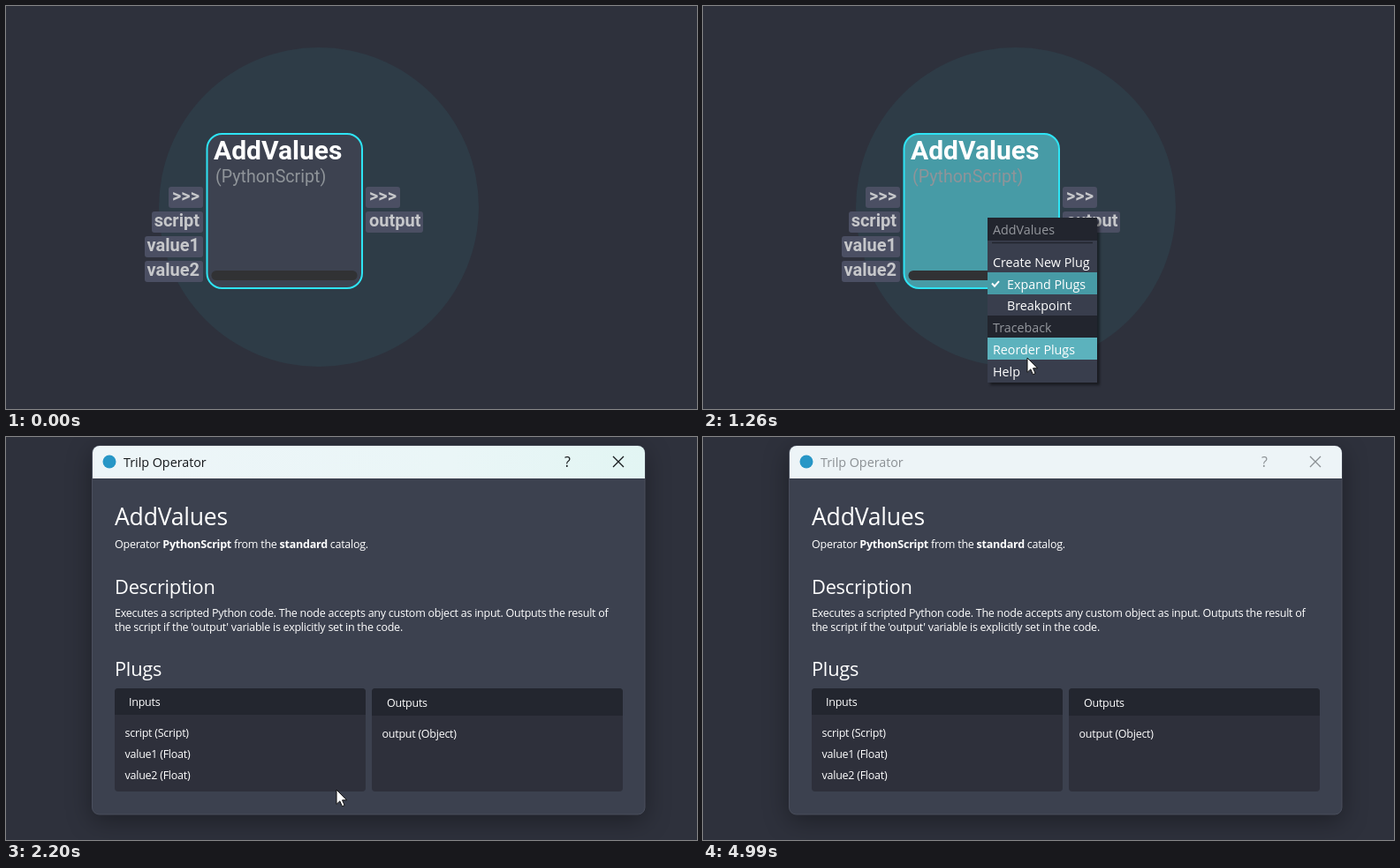
Write an HTML page that moves like this. It is 782 px wide and 457 px high and loops after 5.06 s.

```html
<!DOCTYPE html>
<html lang="en">
<head>
<meta charset="utf-8">
<title>Node help</title>
<style>
  html, body { margin: 0; width: 100%; height: 100%; overflow: hidden; background: #2e313c; }
  svg { display: block; width: 782px; height: 457px; }
  text { white-space: pre; }
  .node { font-family: Roboto, sans-serif; }
  .port { font-size: 20px; font-weight: 700; fill: #c6c7ca; }
  .ui { font: 14.3px "Open Sans", "Noto Sans", sans-serif; }
  .doc { font: 12.5px "Open Sans", "Noto Sans", sans-serif; letter-spacing: -.02em; fill: #fff; }
  .doc .h1 { font-size: 26.6px; }
  .doc .h2 { font-size: 21.8px; }
  .doc .b { font-weight: 700; }
  #window { filter: drop-shadow(0 7px 14px rgba(0, 0, 0, .35)); }
  #menuBox { filter: drop-shadow(3px 3px 1.5px rgba(0, 0, 0, .45)); }
</style>
</head>
<body>
<svg viewBox="0 0 782 457">
  <defs>
    <linearGradient id="bar">
      <stop offset="0" stop-color="#edf5f8"/>
      <stop offset=".65" stop-color="#eaf6f7"/>
      <stop offset="1" stop-color="#e2f5f3"/>
    </linearGradient>
  </defs>
  <rect width="782" height="457" fill="#2e313c"/>
  <circle cx="354" cy="228" r="181" fill="#2e3c47"/>

  <g class="node">
    <rect id="body" x="227.5" y="145" width="175.5" height="175" rx="17" stroke="#2ee4f4" stroke-width="2"/>
    <text x="235" y="174" font-size="30" font-weight="700" fill="#fff">AddValues</text>
    <text x="237" y="200" font-size="19.6" fill="#8f9499">(PythonScript)</text>
    <rect x="232.5" y="300" width="165" height="11" rx="5.5" fill="#313234"/>
    <g id="ports"></g>
  </g>

  <g id="menu" class="ui">
    <rect id="menuBox" x="322" y="240" width="124" height="187" fill="#393e4d"/>
    <g id="rows"></g>
    <path d="M322 265.5H446" stroke="#23262f"/>
    <path d="M327 268.5H441" stroke="#22252e" stroke-width="1.5"/>
    <path d="M327 314.5l3 3.2 5-5.5" fill="none" stroke="#fff" stroke-width="2"/>
  </g>

  <g id="dialog">
    <rect id="window" x="97.5" y="10" width="625.5" height="418" rx="8" fill="#3c414f" stroke="#4a4f5d"/>
    <path id="titleBar" d="M98 47V18a8 8 0 0 1 8-8H715a8 8 0 0 1 8 8V47Z"/>
    <circle cx="117" cy="28" r="7.5" fill="#2796c6"/>
    <g id="titleText" class="ui">
      <text x="133" y="34">Trilp Operator</text>
      <text x="632" y="34" font-size="16">?</text>
      <path d="M687 22l12 12M699 22l-12 12" stroke="currentColor" stroke-width="1.3"/>
    </g>
    <g id="doc" class="doc">
      <text class="h1" x="123" y="100">AddValues</text>
      <text x="123" y="126">Operator <tspan class="b">PythonScript</tspan> from the <tspan class="b">standard</tspan> catalog.</text>
      <text class="h2" x="123" y="178">Description</text>
      <text x="123" y="204">Executes a scripted Python code. The node accepts any custom object as input. Outputs the result of</text>
      <text x="123" y="220">the script if the 'output' variable is explicitly set in the code.</text>
      <text class="h2" x="123" y="271">Plugs</text>
    </g>
  </g>

  <path id="cursor" d="M0 0V16.4L3.8 12.9 6.4 18.8 9.1 17.6 6.5 11.8H11.6Z" fill="#fff" stroke="#111" stroke-width="1" stroke-linejoin="round"/>
</svg>
<script>
const LOOP = 5060, STEP = LOOP / 76;
const $ = id => document.getElementById(id);

function add(parent, tag, attrs, content = '') {
  const el = document.createElementNS('http://www.w3.org/2000/svg', tag);
  for (const key in attrs) el.setAttribute(key, attrs[key]);
  el.textContent = content;
  return parent.appendChild(el);
}

// Ports: label, left edge, top, width, text anchor
[
  ['>>>', 184, 205, 39, 'end'], ['script', 165, 233, 58, 'end'],
  ['value1', 157, 261, 66, 'end'], ['value2', 157, 289, 66, 'end'],
  ['>>>', 407, 205, 39, 'start'], ['output', 407, 233, 65, 'start']
].forEach(([label, x, y, width, anchor]) => {
  add($('ports'), 'rect', { x, y, width, height: 24, rx: 3, fill: '#4b4f63' });
  add($('ports'), 'text', {
    class: 'port', x: anchor === 'end' ? x + width - 4 : x + 4, y: y + 17, 'text-anchor': anchor
  }, label);
});

// Menu rows: label, top, indent, resting fill, whether it can be hovered
const rows = [
  ['AddValues', 240, 6, '#22252e', false],
  ['Create New Plug', 277, 6, 'none', true],
  ['Expand Plugs', 302, 22, '#479ba6', true],
  ['Breakpoint', 326, 22, 'none', true],
  ['Traceback', 351, 6, '#22252e', false],
  ['Reorder Plugs', 376, 6, 'none', true],
  ['Help', 401, 6, 'none', true]
].map(([label, y, indent, fill, active]) => {
  const rect = add($('rows'), 'rect', { x: 322, y, width: 124, height: 25 });
  add($('rows'), 'text', { x: 322 + indent, y: y + 18.5, fill: active ? '#fff' : '#94979d' }, label);
  return { rect, y, fill, active };
});

function plugTable(x, headHeight, title, titleX, plugs) {
  const doc = $('doc'), end = x + 284;
  add(doc, 'rect', { x, y: 285, width: 284, height: 117, rx: 4, fill: '#2e303b' });
  add(doc, 'path', {
    d: `M${x} ${285 + headHeight}V289a4 4 0 0 1 4-4H${end - 4}a4 4 0 0 1 4 4V${285 + headHeight}Z`, fill: '#23262f'
  });
  add(doc, 'text', { x: titleX, y: 275 + headHeight }, title);
  plugs.forEach((plug, i) => add(doc, 'text', { x: x + 11.5, y: 310 + headHeight + i * 24 }, plug));
}
plugTable(123, 30, 'Inputs', 139, ['script (Script)', 'value1 (Float)', 'value2 (Float)']);
plugTable(414, 31, 'Outputs', 431, ['output (Object)']);

// Tables of [time, ...values], interpolated linearly
const pointer = [
  [66, 612, 395], [200, 545, 352], [333, 440, 296], [466, 352, 255], [599, 325, 243],
  [860, 325, 243], [1000, 339, 296], [1130, 357, 362], [1265, 367, 399],
  [1390, 363, 410], [1465, 360, 414], [1731, 360, 414], [2130, 366, 409],
  [2197, 374, 400], [2400, 432, 405], [2663, 471, 417], [3330, 471, 417],
  [3395, 475, 418], [3600, 560, 421], [3862, 639, 425], [3928, 662, 429],
  [4061, 702, 448]
];
const opening = [
  [1660, .84, .05], [1731, .895, .35], [1798, .955, .75], [1864, .985, .95], [1931, 1, 1]
];

function sample(table, t) {
  const i = table.findIndex(row => row[0] > t);
  if (i < 0) return table[table.length - 1].slice(1);
  if (i === 0) return table[0].slice(1);
  const a = table[i - 1], b = table[i], k = (t - a[0]) / (b[0] - a[0]);
  return a.slice(1).map((v, j) => v + (b[j + 1] - v) * k);
}

const show = (id, visible) => $(id).setAttribute('display', visible ? 'inline' : 'none');

function render(ms) {
  const t = Math.floor((ms + 9.5) / STEP) * STEP;
  const [x, y] = sample(pointer, t);
  show('cursor', t > 60 && t < 4115);
  $('cursor').setAttribute('transform', `translate(${x} ${y})`);

  const menuOpen = t > 780 && t < 1650;
  $('body').setAttribute('fill', t < 390 ? '#3d4250' : t > 520 && !menuOpen && t < 1650 ? '#50acb5' : '#479ba6');

  show('menu', menuOpen);
  for (const row of rows) {
    const hovered = row.active && y >= row.y && y < row.y + 25;
    row.rect.setAttribute('fill', hovered ? '#5cb2bd' : row.fill);
  }

  const [scale, opacity] = sample(opening, t);
  show('dialog', t > 1650);
  $('dialog').setAttribute('opacity', opacity);
  $('dialog').setAttribute('transform', `translate(331.5 181) scale(${scale}) translate(-331.5 -181)`);

  const focused = t < 4980, ink = focused ? '#16191c' : '#8b9094';
  $('titleBar').setAttribute('fill', focused ? 'url(#bar)' : '#edf4f7');
  $('titleText').setAttribute('fill', ink);
  $('titleText').setAttribute('color', ink);
}

const start = performance.now();
function tick() {
  render((performance.now() - start) % LOOP);
  requestAnimationFrame(tick);
}
tick();
</script>
</body>
</html>
```
